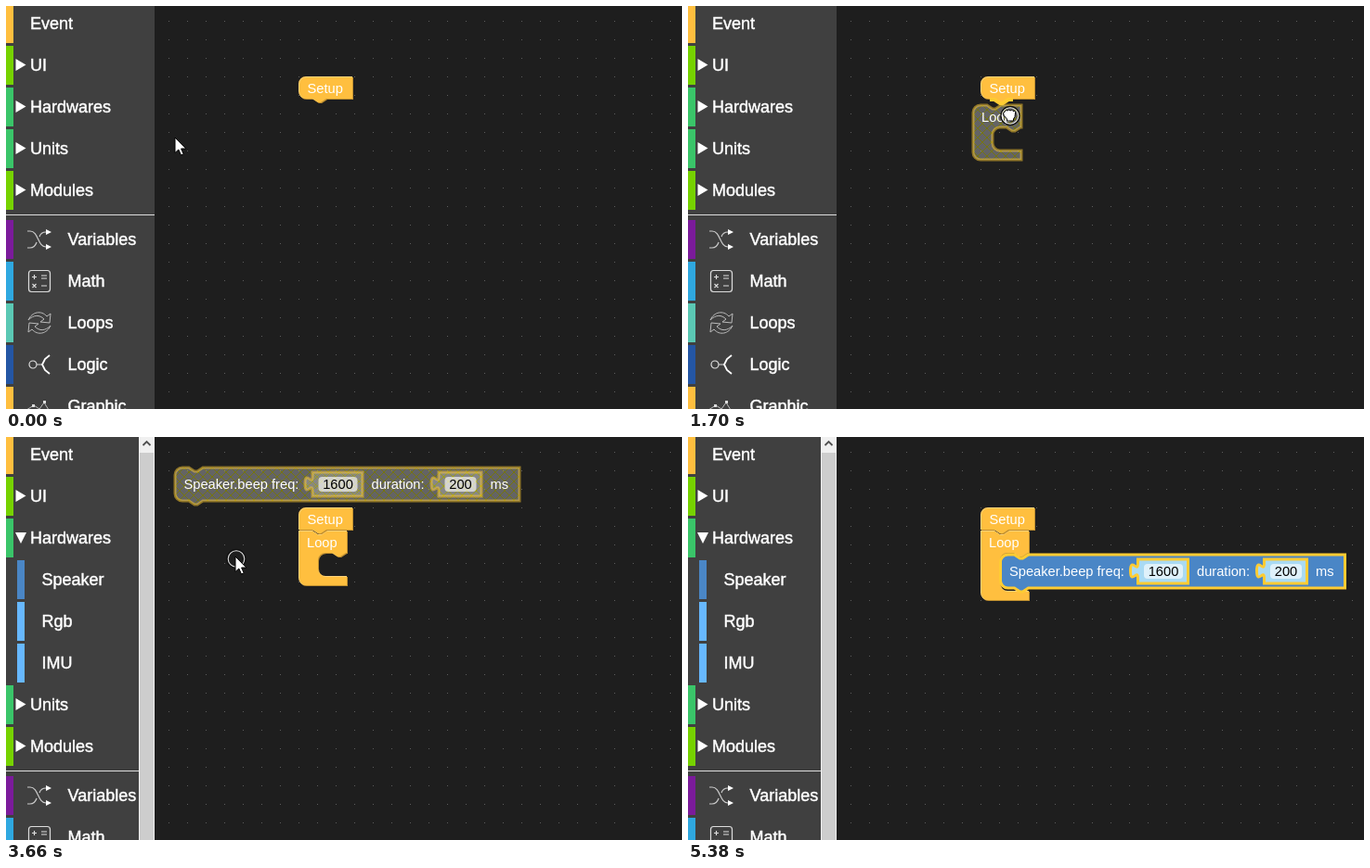
Animation, 728 px wide and 435 px high, one loop 5750 ms. Source, as an HTML page with a canvas:

```html
<!DOCTYPE html>
<html lang="en">
<head>
<meta charset="utf-8">
<title>Block editor</title>
<style>
  html, body { margin: 0; width: 100%; height: 100%; overflow: hidden; background: #1e1e1e; }
  canvas { display: block; }
</style>
</head>
<body>
<canvas id="stage" width="728" height="435"></canvas>
<script>
const ctx = document.getElementById('stage').getContext('2d');
const LOOP = 5750;
const YELLOW = '#ffbf3f', BLUE = '#4a86c6', SKY = '#67b8ff', PALE = '#a9daf3', SELECTED = '#ffcc33';
const SANS = '"Liberation Sans", Arial, sans-serif';

const bursts = [[0, 0, 1], [120, 610, 5], [730, 850, 2], [1100, 1580, 5], [1700, 1700, 1],
  [1950, 2430, 5], [2550, 3030, 5], [3150, 3510, 4], [3660, 4140, 5], [4260, 4380, 2],
  [4630, 4750, 2], [4900, 5380, 5]];
const steps = bursts.flatMap(([from, to, n]) =>
  Array.from({ length: n }, (_, i) => from + (to - from) * i / Math.max(1, n - 1)));

// Pointer path: time, x, y.
const pointerPath = [[0, 182, 142], [490, 95, 30], [610, 80, 18], [730, 110, 17], [850, 215, 16],
  [1100, 215, 16], [1340, 280, 84], [1460, 316, 108], [1580, 341, 114], [1700, 346, 116],
  [1950, 346, 116], [2310, 115, 110], [2430, 80, 107], [2790, 70, 152], [2910, 82, 140],
  [3030, 115, 110], [3390, 212, 39], [3510, 212, 39], [3660, 247, 129], [3900, 310, 156],
  [4140, 345, 158], [4380, 354, 159], [4630, 354, 159], [4750, 355, 184], [5260, 670, 415],
  [5380, 760, 480]];

function pointerAt(t) {
  const i = pointerPath.findIndex(k => k[0] > t);
  if (i < 0) return pointerPath.at(-1).slice(1);
  const [t0, x0, y0] = pointerPath[i - 1], [t1, x1, y1] = pointerPath[i];
  const f = (t - t0) / (t1 - t0);
  return [x0 + (x1 - x0) * f, y0 + (y1 - y0) * f];
}

function rect(x, y, w, h, color) {
  ctx.fillStyle = color;
  ctx.fillRect(x, y, w, h);
}
function text(s, x, y, color = '#fff') {
  ctx.font = `14.67px ${SANS}`;
  ctx.fillStyle = color;
  ctx.fillText(s, x, y);
}
// Sidebar labels are slightly heavier than regular weight.
function label(s, x, y) {
  ctx.font = `18px ${SANS}`;
  ctx.fillStyle = ctx.strokeStyle = '#fff';
  ctx.lineWidth = 0.45;
  ctx.fillText(s, x, y);
  ctx.strokeText(s, x, y);
}
function fill(d, color) {
  ctx.fillStyle = color;
  ctx.fill(new Path2D(d));
}
function stroke(d, color, width) {
  ctx.strokeStyle = color;
  ctx.lineWidth = width;
  ctx.stroke(new Path2D(d));
}
function at(x, y, draw) {
  ctx.save();
  ctx.translate(x, y);
  draw();
  ctx.restore();
}

// ---- Blocks ----
const hatch = (() => {
  const tile = document.createElement('canvas');
  tile.width = tile.height = 10;
  const c = tile.getContext('2d');
  c.fillStyle = '#aaa';
  c.fillRect(0, 0, 10, 10);
  c.strokeStyle = '#cc0';
  c.stroke(new Path2D('M0 0L10 10M10 0L0 10'));
  return ctx.createPattern(tile, 'repeat');
})();

const outline = (w, h, { notch, tab, mouth, plug, round = !plug, foot = !plug }) =>
  (round ? 'M0 8A8 8 0 0 1 8 0' : 'M0 0') +
  (notch ? 'H15l6 4 3 0 6-4' : '') + `H${w}` +
  (mouth ? `V24H51l-6 4-3 0-6-4H29a8 8 0 0 0-8 8v${mouth - 16}a8 8 0 0 0 8 8H${w}` : '') +
  `V${h}` + (tab ? 'H30l-6 4-3 0-6-4' : '') +
  (foot ? `H8A8 8 0 0 1 0 ${h - 8}` : 'H0') +
  (plug ? 'V20c0-10-8 8-8-7.5s8 2.5 8-7.5' : '') + 'Z';

// mode: undefined, 'selected' or 'ghost' (dragged and not connected).
// The last pixel of width and height belongs to the shaded edge.
function body(w, h, color, mode, options) {
  const d = outline(w - 1, h - 1, options);
  ctx.save();
  if (mode === 'ghost') {
    ctx.globalAlpha = 0.5;
    fill(d, hatch);
  } else {
    if (!mode) at(1, 1, () => { fill(d, color); fill(d, 'rgba(0,0,0,.25)'); });
    fill(d, color);
    ctx.save();
    ctx.clip(new Path2D(d));
    ctx.translate(0.5, 0.5);
    stroke(d, 'rgba(255,255,255,.3)', 1);
    ctx.restore();
  }
  if (mode) stroke(d, SELECTED, 3);
  ctx.restore();
}

function field(x, y, w) {
  ctx.fillStyle = 'rgba(255,255,255,.63)';
  ctx.beginPath();
  ctx.roundRect(x, y, w, 16, 4);
  ctx.fill();
}
function dropdown(s, x, w, color) {
  field(x, 4.5, w);
  text(s, x + 4.5, 18, '#000');
  fill(`M${x + w - 14} 10h6l-3 5z`, color);
}
function value(s, x, w, mode) {
  at(x, 5, () => {
    body(w, 27, PALE, mode, { plug: true });
    field(6.5, 5, w - 13);
    ctx.textAlign = 'center';
    text(s, w / 2, 18, '#000');
    ctx.textAlign = 'left';
  });
}

function setupBlock(attached) {
  at(315, 76, () => {
    body(59, 25, YELLOW, '', { tab: true, foot: !attached });
    text('Setup', 9.5, 18);
  });
}
function loopBlock(x, y, mode, attached, mouth = 25) {
  at(x, y, () => {
    body(53, 35 + mouth, YELLOW, mode, { notch: true, mouth, round: !attached });
    text('Loop', 9, 18);
  });
}
function beepBlock(x, y, mode) {
  at(x, y, () => {
    body(372, 37, BLUE, mode, { notch: true, tab: true });
    text('Speaker.beep freq:', 9.5, 23);
    value('1600', 148, 55, mode);
    text('duration:', 211.5, 23);
    value('200', 284, 47, mode);
    text('ms', 339.5, 23);
  });
}
function volumeBlock(x, y) {
  at(x, y, () => {
    body(171, 37, BLUE, '', { notch: true, tab: true });
    value('1', 16, 31);
    text('Speaker.volume', 55.5, 23);
  });
}
function toneBlock(x, y) {
  at(x, y, () => {
    body(246, 25, BLUE, '', { notch: true, tab: true });
    text('play tone', 9, 18);
    dropdown('Low A', 73, 67, BLUE);
    text('for', 144.5, 18);
    dropdown('1', 167, 35, BLUE);
    text('beat', 206.5, 18);
  });
}
function buttonBlock(x, y) {
  at(x, y, () => {
    body(189, 59, YELLOW, '', { mouth: 24 });
    text('Button', 9, 18);
    dropdown('A', 57, 36, YELLOW);
    dropdown('pressed', 103, 79, YELLOW);
  });
}
function obtainBlock(x, y) {
  at(x, y, () => {
    body(230, 25, YELLOW, '', { plug: true });
    text('obtain button', 9.5, 18);
    dropdown('A', 98, 35, YELLOW);
    dropdown('pressed', 144, 79, YELLOW);
  });
}

function connectionHint(x, y) {
  at(x, y, () => stroke('M10 0h5l6 4 3 0 6-4h5', SELECTED, 4));
}
function flyout(right) {
  fill(`M160 0H${right - 8}a8 8 0 0 1 8 8V427a8 8 0 0 1-8 8H160Z`, 'rgba(50,50,50,.82)');
}

// ---- Sidebar; icons are drawn around the row centre ----
const icons = {
  Variables() {
    stroke('M23-9h3c9 0 8 17 17 17h3M23 9h3c4 0 6-3 7-6M36-3c1-3 3-5 7-5h3', '#ccc', 1.2);
    fill('M43-11l6 3-6 3zM43 5l6 3-6 3z', '#fff');
  },
  Math() {
    ctx.beginPath();
    ctx.roundRect(24.5, -11.5, 23, 23, 3);
    ctx.strokeStyle = '#ddd';
    ctx.lineWidth = 1.2;
    ctx.stroke();
    stroke('M28-4.5h5M30.5-7v5M38-6h6M38-3h6M28.5 3l4 4m0-4l-4 4M38 5h6', '#ddd', 1.2);
  },
  Loops() {
    stroke('M24-3c4-9 14-11 20-4l4-3-1 10-10-1 4-3c-5-5-11-5-17 1zM48 3c-4 9-14 11-20 4l-4 3 1-10 10 1-4 3c5 5 11 5 17-1z',
      '#bbb', 1);
  },
  Logic() {
    stroke('M33 0a4 4 0 1 0-8 0a4 4 0 1 0 8 0M33 0h6', '#ddd', 1.2);
    stroke('M47-10l-5 4-3 6 3 6 5 4', '#fff', 1.8);
  },
  Graphic() {
    stroke('M22 4l8-5 6 4 5-7 5 8 3 1', '#bbb', 1);
    fill('M28-2h3v3h-3zM40-6h3v3h-3z', '#ddd');
  }
};
const groups = [['Event', YELLOW], ['UI', '#76d200'], ['Hardwares', '#3ac569'],
  ['Units', '#3ac569'], ['Modules', '#76d200']];
const children = [['Speaker', BLUE], ['Rgb', SKY], ['IMU', SKY]];
const tools = [['Variables', '#7b1b9b'], ['Math', '#2fa8e0'], ['Loops', '#5bc8b4'],
  ['Logic', '#2456a4'], ['Graphic', YELLOW]];

function sidebar(expanded, active) {
  const right = expanded ? 143 : 160;
  rect(0, 0, 160, 435, '#404040');
  let y = 19;
  const row = ([name, color], barX, textX, decorate) => {
    rect(barX, y - 21, name === active ? right - barX : 8, 42, color);
    label(name, textX, y + 6);
    if (decorate) at(0, y, decorate);
    y += 45;
  };
  for (const group of groups) {
    const open = expanded && group[0] === 'Hardwares';
    row(group, 0, 26, group[0] !== 'Event' &&
      (() => fill(open ? 'M10-6h12l-6 12z' : 'M10.5-7v13l11-6.5z', '#fff')));
    if (open) children.forEach(child => row(child, 12, 38.5));
  }
  rect(0, y - 19, right, 1, '#ddd');
  y += 8;
  tools.forEach(tool => row(tool, 0, 66.5, icons[tool[0]]));
  if (expanded) {
    rect(143, 0, 17, 435, '#f0f0f0');
    rect(144, 17, 15, 418, '#cdcdcd');
    stroke('M147.5 9l4-4 4 4', '#505050', 1.8);
  }
}

function pointer([x, y], pressed, grabbing) {
  at(x, y, () => {
    if (pressed) {
      stroke('M11 2.5a10 10 0 1 0-20 0a10 10 0 1 0 20 0', '#111', 1.4);
      stroke('M9.8 2.5a8.8 8.8 0 1 0-17.6 0a8.8 8.8 0 1 0 17.6 0', 'rgba(255,255,255,.85)', 1.1);
    }
    const d = grabbing
      ? 'M-5-2q2-3 3-1q2-2 3 0q2-2 3 .5q3-1 2.5 2.5q0 4-2 6v2h-7v-2q-4-4-4-6z'
      : 'M0 0V16.5L3.8 13 6.5 19 9.2 17.8 6.6 12H11.8Z';
    fill(d, '#fff');
    stroke(d, '#000', 1);
  });
}

function draw(time) {
  const t = steps.findLast(s => s <= time);
  const within = (a, b) => t >= a && t < b;
  const [px, py] = pointerAt(t);
  const dragLoop = within(1220, 1950), dragBeep = within(3660, 4630);
  const looped = t >= 1950, done = t >= 4630;
  const eventMenu = within(730, 1220), speakerMenu = within(2790, 3660);

  rect(0, 0, 728, 435, '#1e1e1e');
  for (let x = 175; x < 728; x += 20)
    for (let y = 16; y < 435; y += 20) rect(x, y, 1, 1, '#5c5c5c');

  if (looped) loopBlock(315, 101, t < 2430 ? 'selected' : '', true, done ? 41 : 25);
  setupBlock(looped);

  if (eventMenu) {
    flyout(424);
    loopBlock(176, 7.5, t >= 1100 ? 'selected' : '');
    buttonBlock(176, 94.5);
    obtainBlock(176, 180.5);
  }
  if (speakerMenu) {
    flyout(566);
    beepBlock(176, 8.5, t >= 3510 ? 'selected' : '');
    volumeBlock(176, 73);
    toneBlock(176, 138.5);
  }
  if (dragLoop) {
    if (t >= 1580) connectionHint(315, 101);
    loopBlock(px - 39, py - 9, 'ghost');
  }
  if (dragBeep) {
    if (t >= 4140) connectionHint(336, 126);
    // The block trails the pointer on the first step of the drag.
    if (t < 3780) beepBlock(182, 33, 'ghost');
    else beepBlock(px - 36, py - 31, 'ghost');
  }
  if (done) beepBlock(336.5, 127, 'selected');

  const active = within(610, 1220) ? 'Event' : within(2430, 2790) ? 'Hardwares' : speakerMenu ? 'Speaker' : '';
  sidebar(t >= 2430, active);

  const clicking = t === 610 || t === 2430 || t === 2790 || t === 3510;
  pointer([px, py], clicking || within(1100, 1950) || dragBeep, dragLoop || within(3780, 4630));
}

const start = performance.now();
(function tick() {
  draw((performance.now() - start) % LOOP);
  requestAnimationFrame(tick);
})();
</script>
</body>
</html>
```
